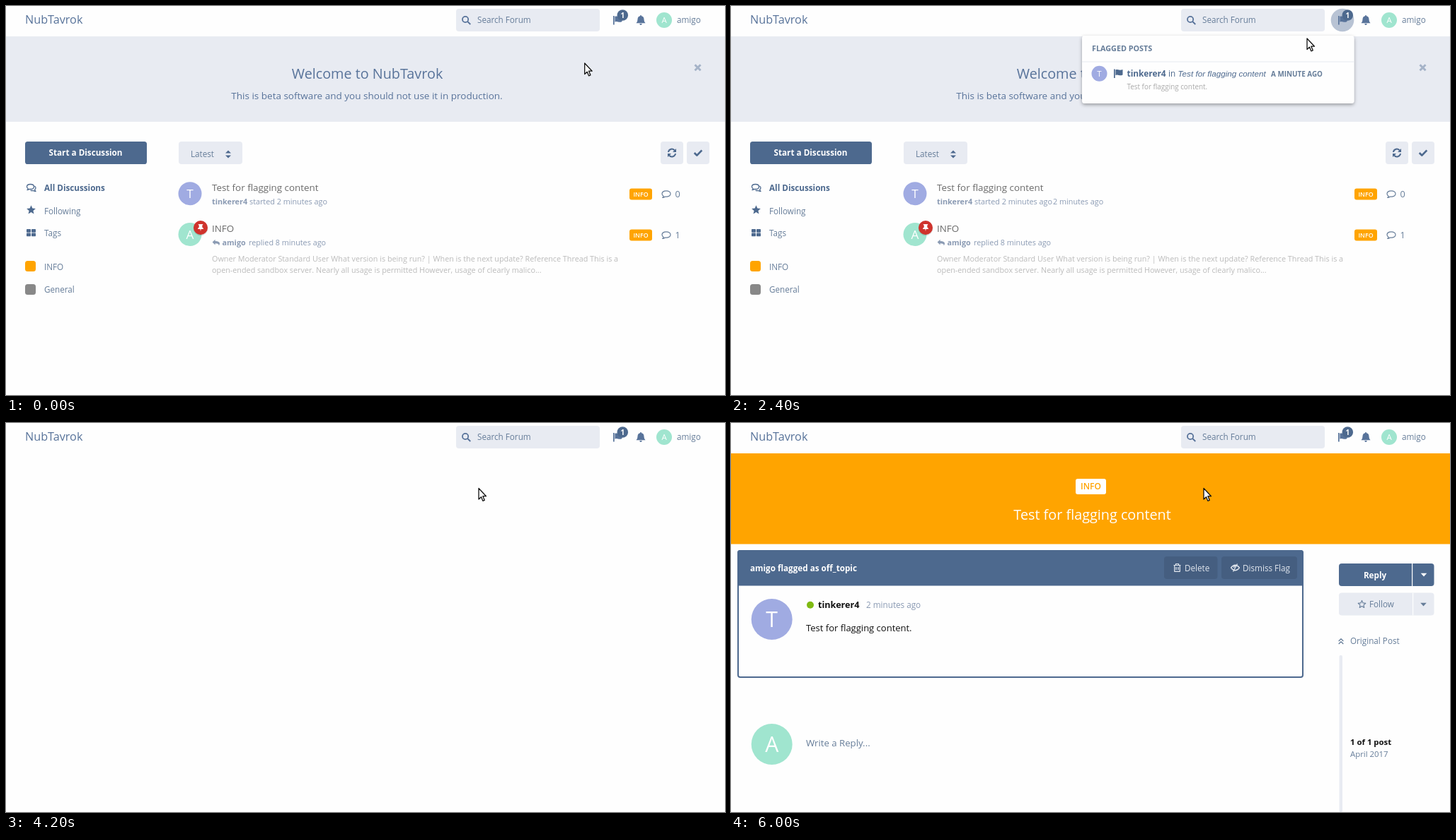
Write an HTML page that moves like this. It is 1016x551 px and loops after 6.1 s.

```html
<!DOCTYPE html>
<html lang="en">
<head>
<meta charset="utf-8">
<title>Forum flag walkthrough</title>
<style>
html, body { margin: 0; width: 100%; height: 100%; overflow: hidden; background: #fefefe; }
svg { display: block; width: 100%; height: 100%; }
text { font-family: "Open Sans", sans-serif; white-space: pre; }
</style>
</head>
<body>
<svg id="stage" viewBox="0 0 1016 551"></svg>
<script>
const LOOP = 6100, STEP = 100;
const SITE = 'NubTavrok', MEMBER = 'tinkerer4', STAFF = 'amigo';
const BLUE = '#4d698e', SOFT = '#58739a', GREY = '#667d99', PALE = '#e8ebf2', WHITE = '#fefefe',
      ORANGE = '#ffa400', MINT = '#a0e5cf', LILAC = '#a0abe2', META = '#8a9ab3';

// Markup helpers
const text = (x, y, str, size = 11.7, fill = GREY, attrs = '') =>
  `<text x="${x}" y="${y}" font-size="${size}" fill="${fill}" ${attrs}>${str}</text>`;
const BOLD = 'font-weight="700"', MID = 'text-anchor="middle" ';
const rect = (x, y, w, h, fill, r = 0, attrs = '') =>
  `<rect x="${x}" y="${y}" width="${w}" height="${h}" rx="${r}" fill="${fill}" ${attrs}/>`;
const circle = (x, y, r, fill) => `<circle cx="${x}" cy="${y}" r="${r}" fill="${fill}"/>`;
const icon = (x, y, d, fill = BLUE, attrs = '') =>
  `<path transform="translate(${x} ${y})" d="${d}" fill="${fill}" ${attrs}/>`;
const line = (x, y, d, width = 1.5, stroke = BLUE) =>
  icon(x, y, d, 'none', `stroke="${stroke}" stroke-width="${width}" stroke-linejoin="round"`);
const group = (id, body) => `<g id="${id}">${body}</g>`;
const avatar = (x, y, r, letter, fill) => circle(x, y, r, fill) +
  text(x, y + r * .37, letter, r * 1.04, '#fff', MID);
const tag = (x, y, w, h, size, fill, ink) => rect(x, y, w, h, fill, 3) +
  text(x + w / 2, y + h / 2 + size * .36, 'INFO', size, ink, MID + 'font-weight="600"');

function starPath(r) {
  return 'M' + Array.from({ length: 10 }, (_, i) => {
    const a = i * Math.PI / 5, k = i % 2 ? r * .46 : r;
    return `${(k * Math.sin(a)).toFixed(2)} ${(-k * Math.cos(a)).toFixed(2)}`;
  }).join('L') + 'Z';
}

const SHAPE = {
  flag: 'M-6-6h1.7v12.5h-1.7zM-3.6-5C-1-6.5 1-3.4 6.5-5.4V2C2 4.4 0 .6-3.6 2.6Z',
  bell: 'M0-7Q1-7 1-5.7Q4.5-5 4.5-1Q4.5 2.5 6.5 4.3H-6.5Q-4.5 2.5-4.5-1Q-4.5-5-1-5.7Q-1-7 0-7ZM-1.8 5H1.8Q1.4 6.9 0 6.9Q-1.4 6.9-1.8 5Z',
  bubble: 'M0-4.7C3.5-4.7 6-3 6-.5S3.5 3.7 0 3.7Q-1 3.7-1.8 3.5Q-3.2 4.9-5.3 5Q-4 3.9-3.9 2.7C-5.2 1.9-6 .8-6-.5C-6-3-3.5-4.7 0-4.7Z',
  smallBubble: 'M0-4C3-4 5-2.5 5-.5S3 3 0 3Q-.8 3-1.5 2.8Q-2.7 4-4.5 4Q-3.4 3.2-3.3 2.2C-4.4 1.5-5 .6-5-.5C-5-2.5-3-4 0-4Z',
  caret: 'M-4.3-2.2H4.3L0 2.5Z',
  pin: 'M-3.2-5H3.2V-3.8H2.3V-.6Q4 .3 4 2H.6L0 5.3L-.6 2H-4Q-4 .3-2.3-.6V-3.8H-3.2Z',
  reply: 'M-5.4-.4L-1.4-4.2V-2Q5-2 5 1.5Q5 3.2 3.6 4.4Q4.4 1.2-1.4 1.2V3.4Z',
  arrow: 'M0 0V15.5L3.5 12.2L5.8 17.8L8.2 16.8L5.9 11.2H10.5Z',
  hand: 'M-1.2.5Q.2-.7 1.5.6V5.2Q3-.1 4.2 5.3Q6-.2 6.6 5.9Q8.4 4.5 8.6 6.6V10Q8.4 12 7.2 13.8H.4Q-1.3 11-4.6 8.2Q-4.7 5.9-1.2 8Z'
};

const topBar = rect(0, 0, 1016, 43, WHITE) +
  text(27, 25, SITE, 16.2, SOFT) +
  rect(636, 4, 203, 32, PALE, 4) +
  line(650, 19, 'M3.2 0A4.1 4.1 0 1 1-5 0A4.1 4.1 0 1 1 3.2 0M2.2 3L6.3 7', 1.8, SOFT) +
  text(666, 24, 'Search Forum') +
  group('flagHover', circle(864, 20, 16.3, '#b8c3d4')) +
  icon(864, 20, SHAPE.flag, SOFT) +
  circle(871.3, 13, 7.8, BLUE) + text(871.3, 16.6, '1', 10, '#fff', MID + BOLD) +
  icon(897, 20, SHAPE.bell, SOFT) +
  avatar(930, 20, 11, 'A', MINT) + text(948, 24, STAFF);

const excerpt = [
  'Owner Moderator Standard User What version is being run? | When is the next update? Reference Thread This is a',
  'open-ended sandbox server. Nearly all usage is permitted However, usage of clearly malico...'
];

const listStats = (y, count) => tag(881, y - 8, 32, 16, 8.8, ORANGE, '#fff') +
  line(933, y, SHAPE.bubble, 1.2, GREY) + text(945.5, y + 4.5, count, 12.6);

const welcome = rect(0, 43, 1016, 121, PALE) +
  text(510.5, 103, 'Welcome to ' + SITE, 19.8, SOFT, MID) +
  text(510, 132, 'This is beta software and you should not use it in production.', 13.5, SOFT, MID) +
  line(977.5, 87.3, 'M-4-4L4 4M4-4L-4 4', 3, '#a5b3c8');

const sidebar = rect(27, 192, 172, 32, BLUE, 3.6) +
  text(112.5, 212, 'Start a Discussion', 11.7, '#fff', MID + BOLD) +
  line(34.5, 256.5, SHAPE.smallBubble, 1.3) +
  line(36.5, 258, 'M4-3Q7 0 4 2.2Q4.2 3.6 5.5 4.6Q2.8 4.6 2 3.4Q0 4-1.8 3.2', 1.3) +
  text(54, 262, 'All Discussions', 11.7, BLUE, BOLD) +
  icon(35.5, 289, starPath(6.7)) + text(54, 294.5, 'Following') +
  [0, 1, 2, 3].map(i => rect(29 + i % 2 * 7, 316 + (i >> 1) * 5.6, 6, 4.7, BLUE, .8)).join('') +
  text(54, 326, 'Tags') +
  rect(27, 361, 15, 15, ORANGE, 3.5) + text(54, 374, 'INFO') +
  rect(27, 394, 15, 15, '#888', 3.5) + text(54, 405.5, 'General');

const toolbar = rect(244, 192, 90, 32, PALE, 4) + text(261, 214, 'Latest') +
  icon(314, 210, 'M-4-1.5L0-5.5L4-1.5ZM-4 1.5L0 5.5L4 1.5Z') +
  rect(925, 192, 32, 32, PALE, 4) + rect(962, 192, 32, 32, PALE, 4) +
  line(941, 208, 'M-5-1A5 5 0 0 1 4-3.4M5 1A5 5 0 0 1-4 3.4', 2) +
  icon(941, 208, 'M6-6V-1H1ZM-6 6V1H-1Z') +
  line(978, 208, 'M-5.3 0L-1.7 3.6L5.3-3.6', 2.7);

const list = avatar(260, 265.7, 16.5, 'T', LILAC) +
  text(291, 262, 'Test for flagging content', 13.4, '#6b6b6b') +
  text(291, 281, MEMBER, 10.8, META, BOLD) + text(344, 281, 'started 2 minutes ago', 10.8, META) +
  group('extraTime', text(455, 281, '2 minutes ago', 10.8, META)) +
  listStats(266.5, '0') +
  avatar(260, 323.5, 16.5, 'A', MINT) + circle(275, 315, 10.3, '#0002') +
  circle(275, 314, 10, '#cf332c') + icon(275, 314, SHAPE.pin, '#fff') +
  text(291, 320, 'INFO', 13.4, '#6b6b6b') + icon(297, 335, SHAPE.reply, META) +
  text(305.5, 339, STAFF, 10.8, META, BOLD) + text(343, 339, 'replied 8 minutes ago', 10.8, META) +
  listStats(324.5, '1') +
  excerpt.map((row, i) => text(291, 362 + i * 16.3, row, 10.8, '#bbb')).join('');

const ITALIC = 'font-style="italic"';
const subject = (id, style, agoX) => group(id,
  text(631.5, 99.5, 'Test for flagging content', 11.7, BLUE, ITALIC + style) +
  text(agoX, 99.5, 'A MINUTE AGO', 9.9, GREY, BOLD));

const dropdown = rect(496, 42, 384.5, 96, WHITE, 4, 'filter="url(#shadow)"') +
  text(510, 64, 'FLAGGED POSTS', 10.8, GREY, BOLD) +
  rect(496, 78.5, 384.5, 1, PALE) +
  group('rowHover', rect(496, 79, 384.5, 50, PALE)) +
  avatar(520.5, 95.7, 11, 'T', LILAC) + icon(547, 95.5, SHAPE.flag) +
  text(559.5, 99.5, MEMBER, 11.9, BLUE, BOLD) + text(618, 99.5, 'in', 11.7, BLUE) +
  subject('subjectEarly', ' style="font-family:\'Liberation Sans\',sans-serif"', 763) +
  subject('subjectLate', '', 758) +
  text(559.5, 118, 'Test for flagging content.', 9.9, '#aaa');

const postButton = (x, w, label, labelX) => rect(x, 189, w, 32, '#455e80', 4) +
  text(labelX, 209.5, label, 11.7, '#e2e7ee');

const post = rect(10, 181, 798, 179, WHITE, 3, `stroke="${BLUE}" stroke-width="2"`) +
  icon(9, 180, 'M4 0H796Q800 0 800 4V50.5H0V4Q0 0 4 0Z') +
  text(27, 209.5, STAFF + ' flagged as off_topic', 11.7, '#fff', BOLD) +
  postButton(612, 75.5, 'Delete', 641) + postButton(693, 107, 'Dismiss Flag', 723) +
  line(630.5, 205, 'M-5-3.5H5M-2-3.5V-5.5H2V-3.5M-3.8-3.5V5.3H3.8V-3.5M-1.5-1V3M1.5-1V3', 1.2, '#e2e7ee') +
  line(712.5, 205, 'M-6 0Q0-7.5 6 0Q0 7.5-6 0ZM-3 5.5L3-5.5M-2 0A2 2 0 0 1 1-2', 1.3, '#e2e7ee') +
  avatar(57.7, 278, 29, 'T', LILAC) + circle(112, 257.7, 5, '#7fba12') +
  text(123, 262, MEMBER, 12.6, '#111', BOLD) + text(191, 262, '2 minutes ago', 11.7, META) +
  text(106, 295, 'Test for flagging content.', 13, '#111');

const thread = rect(0, 43, 1016, 128.5, ORANGE) +
  tag(487, 79, 43, 22, 12, '#fff', ORANGE) +
  text(510.5, 137, 'Test for flagging content', 19.8, '#fff', MID) +
  group('post', post) +
  avatar(57.7, 455, 29, 'A', MINT) + text(106, 458, 'Write a Reply...', 13.2) +
  rect(859, 199, 134.5, 32, BLUE, 4) + rect(962, 199, 1.2, 32, WHITE) +
  text(910, 219.5, 'Reply', 11.7, '#fff', MID + BOLD) + icon(979, 215, SHAPE.caret, '#fff') +
  rect(859, 240.5, 134.5, 32, PALE, 4) + rect(963, 240.5, 1.2, 32, WHITE) +
  line(891.5, 257, starPath(5.6), 1.1, GREY) + text(902, 261, 'Follow') +
  icon(978.5, 257, SHAPE.caret, GREY) +
  line(862, 309, 'M-3.3 0L0-3.3L3.3 0M-3.3 4L0 .7L3.3 4', 1.3, GREY) +
  text(875, 313, 'Original Post') + rect(859.5, 329, 4.5, 222, PALE, 2) +
  group('postCount', text(875, 456, '1 of 1 post', 11.4, '#111', BOLD)) +
  group('postDate', text(875, 473, 'April 2017', 11.4));

const pointer = (id, d) => group(id,
  icon(0, 0, d, '#fff', 'stroke="#111" stroke-width="1.3" stroke-linejoin="round"'));

document.getElementById('stage').innerHTML =
  `<defs><filter id="shadow" x="-5%" y="-15%" width="110%" height="140%">
    <feDropShadow dx="0" dy="2" stdDeviation="2.6" flood-opacity=".35"/></filter></defs>` +
  rect(0, 0, 1016, 551, WHITE) + group('home', welcome + sidebar + toolbar + list) +
  group('thread', thread) + topBar + group('dropdown', dropdown) +
  group('cursor', pointer('arrow', SHAPE.arrow) + pointer('hand', SHAPE.hand));

const el = id => document.getElementById(id);
const show = (id, on) => el(id).setAttribute('display', on ? 'inline' : 'none');
const move = (id, transform) => el(id).setAttribute('transform', transform);
const clamp = v => Math.max(0, Math.min(1, v));

// Time, x, y of the pointer tip
const PATH = [[0, 817.7, 81], [200, 817.7, 81], [1000, 864, 21], [2100, 864, 21],
  [2400, 814, 46], [2800, 790, 58], [3600, 668, 92.5], [LOOP, 668, 92.5]];

function pointerAt(t) {
  const i = PATH.findIndex(p => p[0] > t), [t0, x0, y0] = PATH[i - 1], [t1, x1, y1] = PATH[i];
  const k = (t - t0) / (t1 - t0), e = k * k * (3 - 2 * k);
  return [x0 + (x1 - x0) * e, y0 + (y1 - y0) * e];
}

const OPEN = 1800, LEAVE = 4100, ARRIVE = 4500;

function draw(now) {
  const t = Math.floor(now % LOOP / STEP) * STEP;
  const [x, y] = pointerAt(t);
  const menu = t >= OPEN && t < LEAVE;
  const onFlag = Math.hypot(x - 864, y - 20) < 16;
  const onRow = menu && y > 79;

  show('home', t < LEAVE);
  show('thread', t >= ARRIVE);
  show('dropdown', menu);
  show('flagHover', menu || onFlag);
  show('extraTime', t >= OPEN);
  show('rowHover', onRow);
  show('subjectEarly', t < 2600);
  show('subjectLate', t >= 2600);

  const hand = onFlag || onRow;
  show('hand', hand);
  show('arrow', !hand);
  move('cursor', `translate(${x} ${y})`);

  // The post fades in while it settles to its resting size
  const age = t - ARRIVE, swell = 1 + .0185 * clamp(1 - age / 150);
  el('post').setAttribute('opacity', clamp(.46 + age / 400));
  move('post', `translate(409 270.5) scale(${swell}) translate(-409 -270.5)`);
  const lift = clamp(1 - age / 200);
  move('postCount', `translate(0 ${-1.7 * lift})`);
  move('postDate', `translate(0 ${-lift})`);
  requestAnimationFrame(draw);
}
requestAnimationFrame(draw);
</script>
</body>
</html>
```
